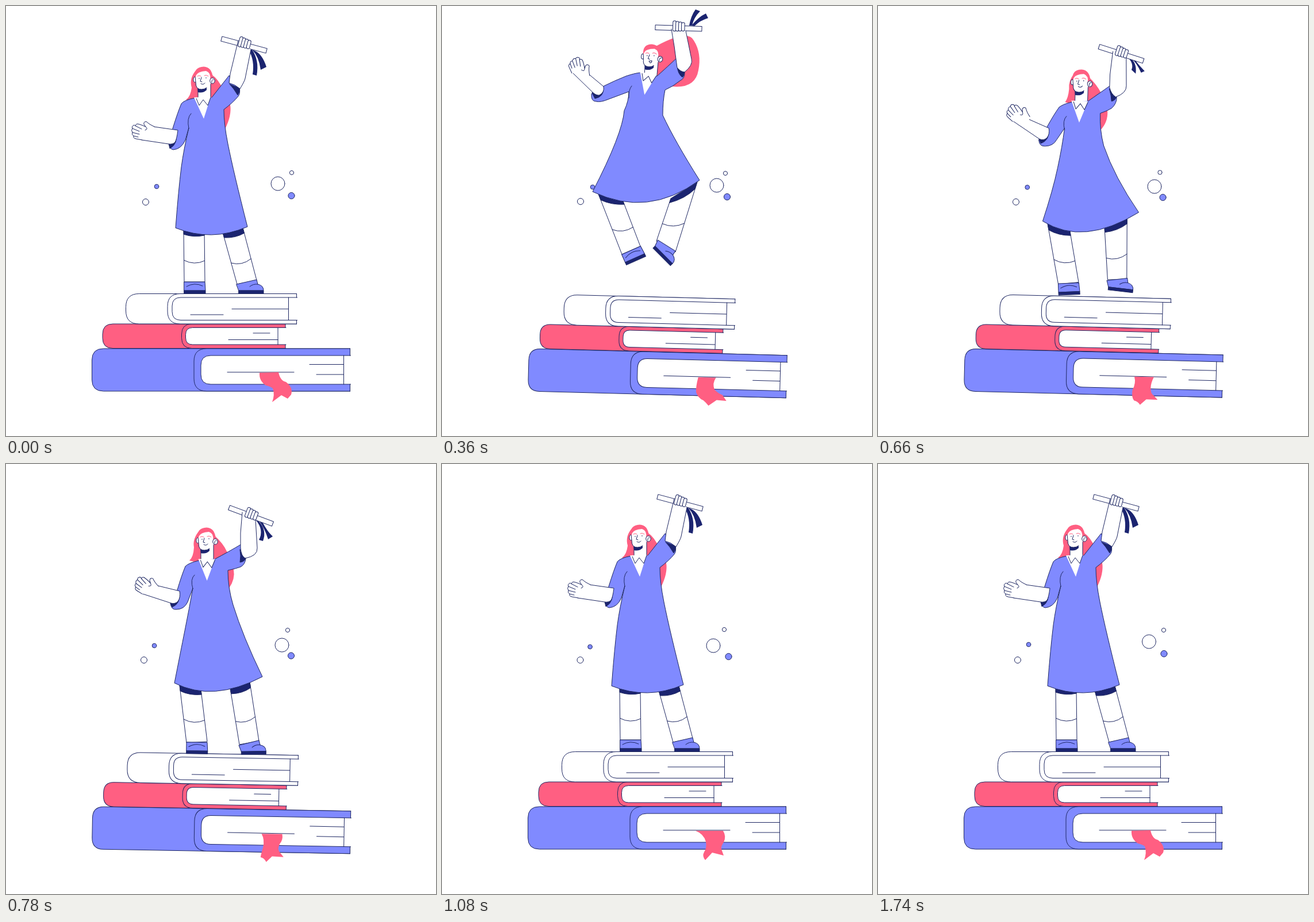
An HTML page with a canvas that plays this animation: 748 px wide and 748 px high, repeating every 1.77 s.

```html
<!DOCTYPE html>
<html lang="en">
<head>
<meta charset="utf-8">
<title>Celebration jump</title>
<style>
html, body { margin: 0; width: 100%; height: 100%; overflow: hidden; background: #fff; }
canvas { display: block; }
</style>
</head>
<body>
<canvas id="stage" width="748" height="748"></canvas>
<script>
const ctx = document.getElementById('stage').getContext('2d');
const LOOP = 1770, STEP = 30;
const TIMES = [0, 210, 360, 540, 780, 1080, 1740, LOOP];
const WHITE = '#fff', BLUE = '#808aff', PINK = '#ff5f82', DARK = '#1b2470', LINE = '#1f2863';

// A track is one string per key time; missing keys return to the first one.
function track(...keys) {
  const rows = keys.map(k => k.match(/-?[\d.]+/g).map(Number));
  while (rows.length < TIMES.length) rows.push(rows[0]);
  return { shape: keys[0], rows };
}

function values({ rows }, t) {
  let k = 0;
  while (k < TIMES.length - 2 && t >= TIMES[k + 1]) k++;
  const span = TIMES[k + 1] - TIMES[k], u = (t - TIMES[k]) / span;
  return rows[0].map((_, i) => {
    const slope = j => {
      if (j < 1 || j > TIMES.length - 2) return 0;
      const before = rows[j][i] - rows[j - 1][i], after = rows[j + 1][i] - rows[j][i];
      return before * after > 0 ? (before + after) / (TIMES[j + 1] - TIMES[j - 1]) : 0;
    };
    const a = rows[k][i], b = rows[k + 1][i], v = 1 - u;
    return a + (b - a) * u * u * (3 - 2 * u) + span * u * v * (slope(k) * v - slope(k + 1) * u);
  });
}

function morph(tr, t) {
  const v = values(tr, t);
  let i = 0;
  return tr.shape.replace(/-?[\d.]+/g, () => v[i++].toFixed(2));
}

function draw(path, fill, line = LINE) {
  const p = new Path2D(path);
  if (fill) { ctx.fillStyle = fill; ctx.fill(p); }
  if (line) { ctx.strokeStyle = line; ctx.stroke(p); }
}

function oval(x, y, rx, ry, fill, line = LINE) {
  ctx.beginPath();
  ctx.ellipse(x, y, rx, ry, 0, 0, 7);
  ctx.fillStyle = fill;
  ctx.fill();
  if (line) { ctx.strokeStyle = line; ctx.stroke(); }
}

function place(tr, t, paint) {
  const [x, y, deg] = values(tr, t);
  ctx.save();
  ctx.translate(x, y);
  ctx.rotate(deg * Math.PI / 180);
  paint();
  ctx.restore();
}

// ---- Bubbles: radius, colour, path
const bubbles = [
  [12, WHITE, track('473 309', '475 311', '478 312', '481 313', '480 315', '472 316', '471.5 309')],
  [3.6, WHITE, track('497 290', '495 291', '493 291', '491.5 290', '490 289', '491 288', '497 289')],
  [5.6, BLUE, track('496.5 330', '496.5 331.5', '496 332', '495.5 332.5', '496 333.5', '498.5 335', '497.5 330')],
  [3.8, BLUE, track('262 314', '262 315', '262 315', '261.5 315', '258 316', '257.5 318', '262 314')],
  [5.5, WHITE, track('243 341', '242 340', '241 340', '240 340.5', '240 341', '240.5 341', '243 341')]
];

// ---- Books
const tilt = track('0', '.4', '1.5', '.25', '1');
const markRight = track(
  'M441,638 L474,637 Q477,652 487,654 Q500,664 496,676 L490,683 L479,677',
  'M442,639 L473,638 Q474,651 482,658 Q489,662 494,662 L497,680 L482,676',
  'M445,638 L476,638 Q469,648 474,659 Q480,665 488,668 L495,678 L478,677',
  'M446,637 L479,637 Q469,647 474,659 Q478,668 485,670 L492,676 L473,676',
  'M444,638 L480,638 Q482,648 476,655 Q472,664 475,668 L483,678 L463,677',
  'M441,638 L489,638 Q495,648 490,658 Q485,665 486,670 L490,681 L470,676');
const markLeft = track(
  'L463,689 Q468,676 464,665 Q460,662 452,660 Q440,652 441,638',
  'L465,688 Q464,678 461,672 Q457,664 450,661 Q437,653 442,639',
  'L464,687 Q460,682 455,678 Q445,674 442,664 Q441,655 445,638',
  'L461,686 Q457,680 450,679 Q440,674 440,660 Q447,650 446,637',
  'L453,687 Q449,680 443,679 Q444,672 447,662 Q450,648 444,638',
  'L458,689 Q452,682 456,675 Q461,668 459,657 Q455,643 441,638');

function book(fill, top, bottom, right, thick, [spine, r], [cover, cr], [page, pr], edge, lines) {
  const sleeve = (x, y0, y1, q, end = right) =>
    `M${end},${y0} H${x + q} Q${x},${y0} ${x},${y0 + q} V${y1 - q} Q${x},${y1} ${x + q},${y1} H${end}`;
  const y0 = top + thick, y1 = bottom - thick;
  draw(sleeve(spine, top, bottom, r), fill);
  draw(sleeve(cover, top, bottom, cr), fill);
  draw(sleeve(page, y0, y1, pr, right + 1), WHITE);
  draw(`M${right},${top} V${y0} M${right},${y1} V${bottom} M${edge},${y0} V${y1} ${lines}`);
}

function books(t, bump) {
  ctx.save();
  ctx.translate(150, 670);
  ctx.rotate((values(tilt, t)[0] + .9 * bump) * Math.PI / 180);
  ctx.translate(-150, -670);
  book(BLUE, 596, 670, 598.5, 12, [149.5, 20], [327, 22], [339, 17], 587.5,
    'M528,623.5 H587 M540,641 H587 M385,637 H501');
  book(PINK, 553, 595.5, 486, 6.5, [168, 18], [305.5, 18], [312.5, 12], 473,
    'M430,569 H459 M387,580.5 H473');
  book(WHITE, 500.5, 553, 505.5, 6.5, [208.5, 23], [281, 22], [289, 15], 491.5,
    'M393,527 H491 M321,537 H378');
  draw(morph(markRight, t) + morph(markLeft, t), PINK, null);
  ctx.restore();
}

// ---- Head
const hair = track(
  'M332,110 Q318,125 323,142 Q321,158 313,163 L330,168 L381,214 Q393,190 390,172 Q386,154 378,147 Q371,128 356,118Z',
  'M306,84 Q300,95 306,110 Q305,125 310,134 L325,132 L360,130 Q375,132 382,132 Q378,118 368,108 Q355,92 332,89Z',
  'M356,75 Q354,82 356,90 Q357,96 359,100 L372,118 L392,139 Q440,147 446,112 Q452,82 438,60 Q428,40 374,69Z',
  'M358,88 Q351,100 350,112 Q347,122 347,131 L360,140 L385,179 Q407,178 413,148 Q417,128 405,113 Q395,95 378,90Z',
  'M337,115 Q324,130 327,145 Q326,162 319,168 L336,172 L388,216 Q399,200 396,184 Q392,160 384,152 Q378,138 362,124Z');
const head = track('343 130 0', '319.5 102.5 -14', '363.5 91 5', '364 106 9', '348 135 0');

function face(airborne) {
  draw('M-9,10 V32 H13 V5', WHITE);
  draw('M-10,13 Q-2,17 6,12 L6,16 Q0,22 -9,20Z', DARK, null);
  oval(-14.5, -2, 2.6, 4.5, WHITE);
  draw('M-14,-12 L-12.5,8 Q-11,15 -3,15 Q8,14 13,5 L14,-16 L-8,-20', WHITE, null);
  draw('M-14,-8 L-12.5,8 Q-11,15 -3,15 Q3,15 6,12');
  draw('M-14,-5 Q-17,-24 1,-24.5 Q15,-24 17,-5 L12,-2 Q14,-14 5,-17 Q-9,-16 -12,-10Z', PINK, null);
  oval(16, 0, 4.3, 5, WHITE);
  draw('M18,-2 Q14,-2 15,3');
  draw('M-10,-8 Q-7,-10 -4,-8 M2,-9 Q5,-11 9,-8', null, PINK);
  oval(-7, -4, .8, .8, LINE, null);
  oval(5, -5, .8, .8, LINE, null);
  draw('M-3,-6 L-5,1 L-2,2');
  draw(airborne ? 'M-3,5 L2,4 Q2,8 -1,8Z' : 'M-4,5 Q0,8 3,4');
}

// ---- Legs: top left, top right, bottom left, bottom right
const leftLeg = track('309 388 345 390 310 480 346 480', '279 352 323 362 312 437 347 432',
  '272 327 314 337 313 432 345 418', '274 340 317 352 312 450 345 438', '302 385 339 392 314 485 350 483');
const rightLeg = track('377 394 412 386 402 484 436 477', '375 365 408 350 401 482 434 474',
  '398 335 444 306 373 409 406 428', '402 347 456 314 373 407 404 428', '390 390 424 379 406 488 440 482');
const leftShoe = track('328 480 0', '329.5 435 -8', '329 425 -24', '329 444 -20', '332 484 1');
const rightShoe = track('419 480 0', '419 480 0', '391 417 45', '390 416 44', '423 485 -1');

function leg(tr, t) {
  const [ax, ay, bx, by, cx, cy, dx, dy] = values(tr, t);
  const band = (f, sag) => {
    const x0 = ax + (cx - ax) * f, y0 = ay + (cy - ay) * f;
    const x1 = bx + (dx - bx) * f, y1 = by + (dy - by) * f;
    return `${x0},${y0} Q${(x0 + x1) / 2 - (y1 - y0) * .2},${(y0 + y1) / 2 + sag} ${x1},${y1}`;
  };
  draw(`M${ax},${ay} L${cx},${cy} L${dx},${dy} L${bx},${by}`, WHITE);
  draw(`M${ax},${ay} L${band(.1, 5)} L${bx},${by}Z`, DARK);
  draw(`M${band(.59, 9)}`);
}

function leftFoot() {
  draw('M-18,0 H18 L19,15 H-18Z', BLUE);
  draw('M-14,8 Q0,0 14,7');
  draw('M-18,15 H19 V20 H-18Z', DARK);
}

function rightFoot() {
  draw('M-18,4 L17,-4 L19,4 Q29,6 29,15 H-14Z', BLUE);
  draw('M5,8 Q11,3 19,4');
  draw('M-14,15 H29 V20 H-14Z', DARK);
}

// ---- Dress
const dressLeft = track(
  'M328,160 Q309,164 305,170 Q299,184 290,213 Q288,225 283,240 Q286,250 291,250 Q305,249 312,233 L318,212',
  'M315,135 Q305,142 294,150 Q289,170 286,195 Q284,210 284,224 Q289,231 293,229 Q305,225 309,212 L315,187',
  'M344,116 Q335,117 320,122 Q300,130 282,139 Q270,147 260,153 Q259,166 268,166 Q276,168 290,162 L325,149',
  'M341,133 Q332,135 322,137 Q305,139 277,143 Q264,150 254,157 Q252,170 268,171 Q278,171 290,168 L323,165',
  'M335,168 Q318,172 312,178 Q305,195 298,219 Q292,232 286,243 Q288,254 296,253 Q310,253 316,240 L325,216');
const skirt = track(
  'Q309,250 305,280 Q300,320 295,386 Q357,411 420,384 Q396,290 386,240 Q379,205 379,180',
  'Q312,225 300,253 Q283,295 261,343 Q338,396 412,346 Q400,282 393,240 Q386,195 373,165',
  'Q325,165 317,182 Q314,222 262,323 Q358,369 448,303 Q405,235 384,190 Q384,165 388,146',
  'Q323,185 316,207 Q309,240 265,333 Q345,404 468,307 Q407,255 383,204 Q383,185 387,165',
  'Q319,250 311,290 Q303,330 293,381 Q360,415 446,370 Q412,300 395,245 Q386,215 386,185');
const dressRight = track(
  'Q395,168 404,157 Q408,152 406,142 L388,121 Q373,140 358,159',
  'Q375,165 377,163 Q380,163 385,163 L403,142 Q360,117 342,126',
  'Q402,140 414,130 Q423,126 422,114 L411,88 Q393,105 374,122',
  'Q397,155 402,142 Q414,125 408,114 L382,103 Q376,120 370,138',
  'Q400,182 408,179 Q416,175 417,164 L412,138 Q385,154 364,165');
const crease = track('M322,187 Q314,195 318,213', 'M313,163 Q306,175 315,188', 'M330,139 Q324,146 325,160',
  'M327,156 Q321,165 323,180', 'M328,193 Q320,200 325,217');
const collar = track('342 160 0', '329.5 131 -8', '359 119 14', '355.5 136 12', '349.5 167 3');

function neckline() {
  draw('M-15,-1 L2,36 L14,-2Z', WHITE, null);
  draw('M-11,1 L-6,13 L1,3 L9,13 L14,-1', WHITE);
}

// ---- Open hand
const leftCuff = track('M296,217 Q300,240 285,248 L283,239Z', 'M293,196 Q297,214 286,224 L283,220Z',
  'M281,142 Q282,158 266,161 L261,151Z', 'M278,146 Q278,160 260,163 L256,154Z', 'M302,223 Q304,243 289,249 L286,242Z');
const leftArm = track(
  'M257,210 L299,216 Q297,232 294,237 Q290,241 283,240 L236,233',
  'M252,196 L293,195 Q295,208 292,215 Q290,221 284,221 L249,223',
  'M257,120 L281,140 Q283,150 274,155 Q268,156 262,150 L228,117',
  'M257,118 L278,143 Q280,153 271,157 Q264,160 258,153 L226,116',
  'M265,212 L302,221 Q304,232 299,239 Q294,244 287,242 L238,226');
const openHand = track('250 220 0', '251 208 -38', '244 120 55', '244 119 55', '254 219 22');

function palm() {
  draw('M8,-10 Q-1,-14 -6,-19 Q-11,-19 -10,-14 L-7,-10 Q-16,-14 -21,-15 Q-26,-14 -24,-11 L-27,-13 ' +
    'Q-32,-11 -30,-7 Q-33,-4 -30,0 Q-32,4 -28,6 Q-29,10 -24,11 L-13,13', WHITE);
  draw('M-24,-11 L-14,-6 M-30,-7 L-18,-2 M-30,0 L-18,3 M-28,6 L-20,8 M-7,-10 Q-2,-6 -8,-4');
}

// ---- Diploma arm
const rightCuff = track('M389,136 L407,143 Q406,151 403,155 Q396,143 389,136', 'M391,150 L388,163 Q382,163 378,161 Q386,158 391,150',
  'M409,104 L422,115 Q421,122 418,124 Q410,118 409,104', 'M384,103 L405,113 Q405,120 403,123 Q393,115 384,103',
  'M407,149 L417,164 Q415,170 407,171 Q409,160 407,149');
const rightArm = track(
  'M404,60 L390,118 L388,134 Q398,136 407,144 Q415,131 416,126 L426,76',
  'M450,163 L425,152 L403,142 Q398,152 388,161 Q440,188 450,187 L462,184',
  'M399,40 L404,70 L409,107 Q414,114 422,115 Q437,103 434,92 L424,43',
  'M399,38 L386,85 L382,103 Q392,106 404,114 Q410,95 412,89 L423,42',
  'M411,84 L408,120 L408,146 Q409,160 416,164 Q438,160 437,146 L434,96');
const scroll = track('414 67.5 15', '462.5 171 72', '411.5 38.5 1.7', '411 34 4', '426 90 20.5');
const ribbonA = track('M422,76 Q433,95 429,119 L436,121 Q441,95 428,76Z', 'M459,184 Q448,200 450,222 L457,224 Q455,208 464,188Z',
  'M430,34 Q433,17 441,6 L449,9 Q438,20 435,34Z', 'M430,31 Q432,17 441,6 L449,10 Q438,19 436,31Z',
  'M435,98 Q449,115 440,132 L447,134 Q454,115 440,100Z');
const ribbonB = track('M428,76 Q440,88 443,111 L453,106 Q446,84 433,78Z', 'M462,186 Q460,210 464,230 L471,226 Q465,210 466,190Z',
  'M434,34 Q446,19 459,13 L463,21 Q449,25 439,35Z', 'M435,32 Q447,19 459,15 L463,23 Q450,24 441,33Z',
  'M441,100 Q450,112 456,131 L464,126 Q455,118 446,101Z');

function fist() {
  for (let i = 0; i < 4; i++) {
    ctx.beginPath();
    ctx.roundRect(-10 + 5 * i, -12.5 + .8 * i, 5.6, 18 - i, 2.7);
    ctx.fillStyle = WHITE;
    ctx.fill();
    ctx.strokeStyle = LINE;
    ctx.stroke();
  }
}

function figure(t) {
  draw(morph(hair, t), PINK, null);
  place(head, t, () => face(t > 120 && t < 700));
  leg(leftLeg, t);
  leg(rightLeg, t);
  place(leftShoe, t, leftFoot);
  place(rightShoe, t, rightFoot);
  draw(morph(dressLeft, t) + morph(skirt, t) + morph(dressRight, t), BLUE);
  draw(morph(crease, t));
  place(collar, t, neckline);
  draw(morph(leftCuff, t), DARK);
  draw(morph(leftArm, t), WHITE);
  place(openHand, t, palm);
  draw(morph(ribbonA, t), DARK, null);
  draw(morph(ribbonB, t), DARK, null);
  place(scroll, t, () => draw('M-40.5,-4.2 H40.5 V4.2 H-40.5Z', WHITE));
  draw(morph(rightCuff, t), DARK);
  draw(morph(rightArm, t), WHITE);
  place(scroll, t, fist);
}

// The fall is quick and settles before the next pose.
function fall(t) {
  const u = (t - 540) / 240;
  return u > 0 && u < 1 ? 540 + 240 * (1 - (1 - u) ** 1.8) : t;
}

function render(now) {
  const t = Math.floor(now % LOOP / STEP) * STEP;
  const bump = t > 600 && t < 780 ? Math.sin((t - 600) / 180 * Math.PI) : 0;
  ctx.fillStyle = WHITE;
  ctx.fillRect(0, 0, 748, 748);
  ctx.lineWidth = 1;
  ctx.lineJoin = ctx.lineCap = 'round';
  for (const [r, fill, tr] of bubbles) oval(...values(tr, t), r, r, fill);
  books(t, bump);
  ctx.save();
  ctx.translate(0, 5 * bump);
  figure(fall(t));
  ctx.restore();
}

function loop(now) {
  render(now);
  requestAnimationFrame(loop);
}
render(0);
requestAnimationFrame(loop);
</script>
</body>
</html>
```
